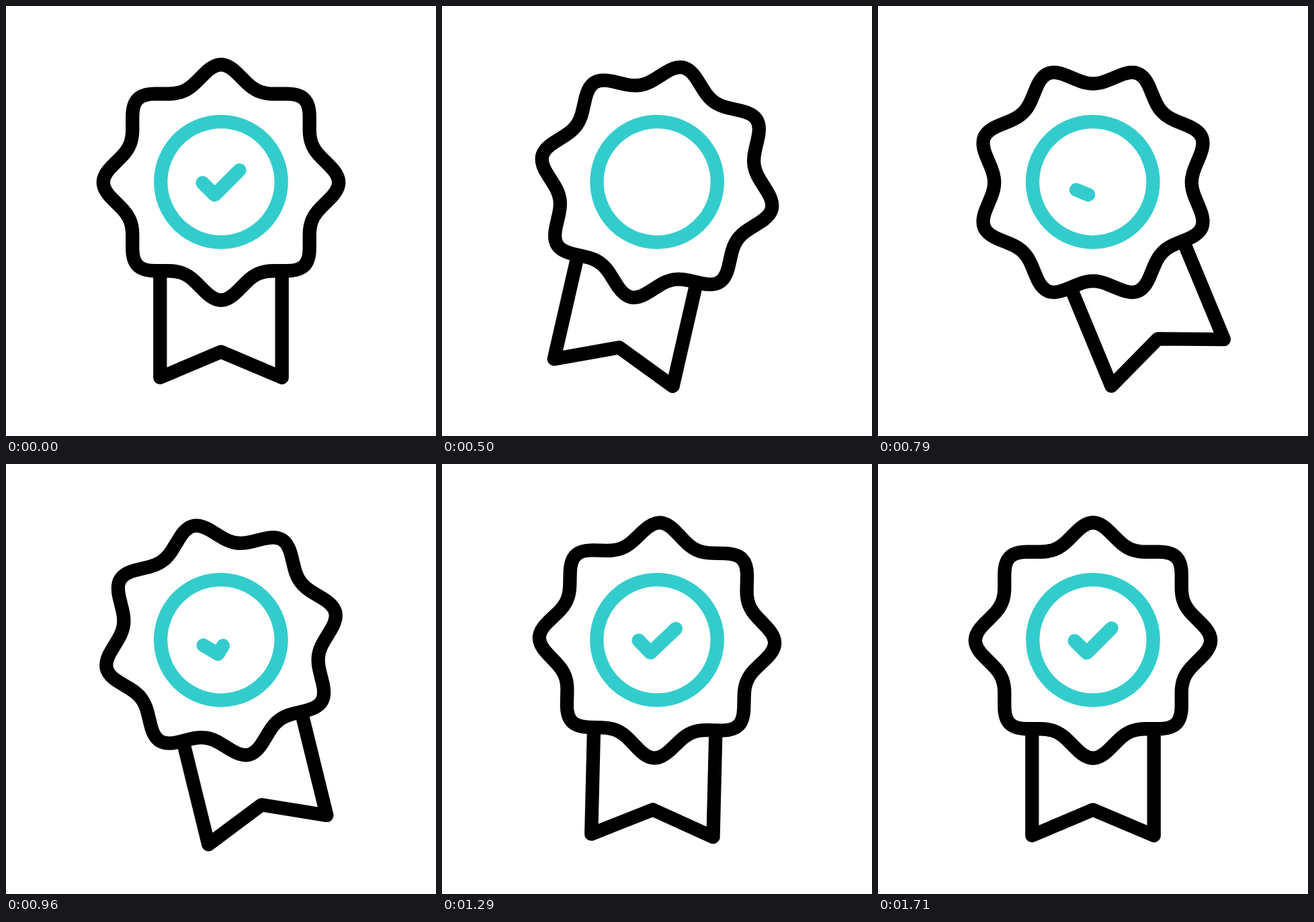
These frames come from a looping animation (640 by 640 pixels, 2040 ms). An HTML page:

```html
<!DOCTYPE html>
<html lang="en">
<head>
<meta charset="utf-8">
<title>Award badge</title>
<style>
  html, body { margin: 0; width: 100%; height: 100%; overflow: hidden; background: #fff; }
  svg { display: block; width: 100%; height: 100%; }
</style>
</head>
<body>
<svg viewBox="0 0 640 640" fill="none" stroke-width="20.3" stroke-linejoin="round">
  <g id="badge">
    <g stroke="#000">
      <path d="M229.3 394V553L320 514.6L410.7 553V394"/>
      <path id="seal"/>
    </g>
    <g stroke="#33cccc">
      <circle cx="320" cy="261.8" r="89.7"/>
      <path id="tick" d="M292.6 263.2L310.8 281.2L347.5 244.4" pathLength="1" stroke-linecap="round"/>
    </g>
  </g>
</svg>
<script>
const LOOP = 2040, CX = 320, CY = 262.5;
const badge = document.getElementById('badge');
const tick = document.getElementById('tick');

// Swing keys: [step, degrees], 24 steps per second
const SWING = [[4, 0], [12, 12.9], [20, -23.9], [27.5, 5.3], [35, -3.4], [41, 0]];

const clamp = x => Math.min(1, Math.max(0, x));
const ease = x => (1 - Math.cos(Math.PI * x)) / 2;

function polar(r, deg) {
  const a = deg * Math.PI / 180;
  return [CX + r * Math.sin(a), CY - r * Math.cos(a)];
}

// Point at a given distance from p towards q, as path text
function toward(p, q, dist) {
  const k = dist / Math.hypot(q[0] - p[0], q[1] - p[1]);
  return p.map((v, i) => (v + (q[i] - v) * k).toFixed(2)).join(' ');
}

// Eight-pointed star with softly rounded tips and valleys
function sealPath() {
  const corner = i => polar(i % 2 ? 142.6 : 186.3, i * 22.5);
  let d = '';
  for (let i = 0; i < 16; i++) {
    const c = corner(i), prev = corner(i + 15), next = corner(i + 1);
    const len = i % 2 ? 24 : 34, grip = len * 0.28;
    d += (i ? 'L' : 'M') + toward(c, prev, len) +
      'C' + toward(c, prev, grip) + ' ' + toward(c, next, grip) + ' ' + toward(c, next, len);
  }
  return d + 'Z';
}

function swing(n) {
  for (let i = 1; i < SWING.length; i++) {
    const [n0, a0] = SWING[i - 1], [n1, a1] = SWING[i];
    if (n < n1) return a0 + (a1 - a0) * ease(clamp((n - n0) / (n1 - n0)));
  }
  return 0;
}

function tickLength(n) {
  return n < 12 ? 1 - clamp((n - 2) / 6.05) : clamp((n - 15.2) / 15.1);
}

// Steps begin on whole hundredths of a second
const stepStart = n => 10 * Math.round(n * 25 / 6);

function draw(t) {
  let n = 48;
  while (n > 0 && stepStart(n) > t) n--;
  badge.setAttribute('transform', `rotate(${swing(n)} ${CX} ${CY})`);
  const p = tickLength(n);
  tick.setAttribute('visibility', p > 0 ? 'visible' : 'hidden');
  tick.setAttribute('stroke-dasharray', p < 1 ? p + ' 3' : 'none');
}

document.getElementById('seal').setAttribute('d', sealPath());
const begin = performance.now();
function update() {
  draw((performance.now() - begin) % LOOP);
  requestAnimationFrame(update);
}
update();
</script>
</body>
</html>
```
